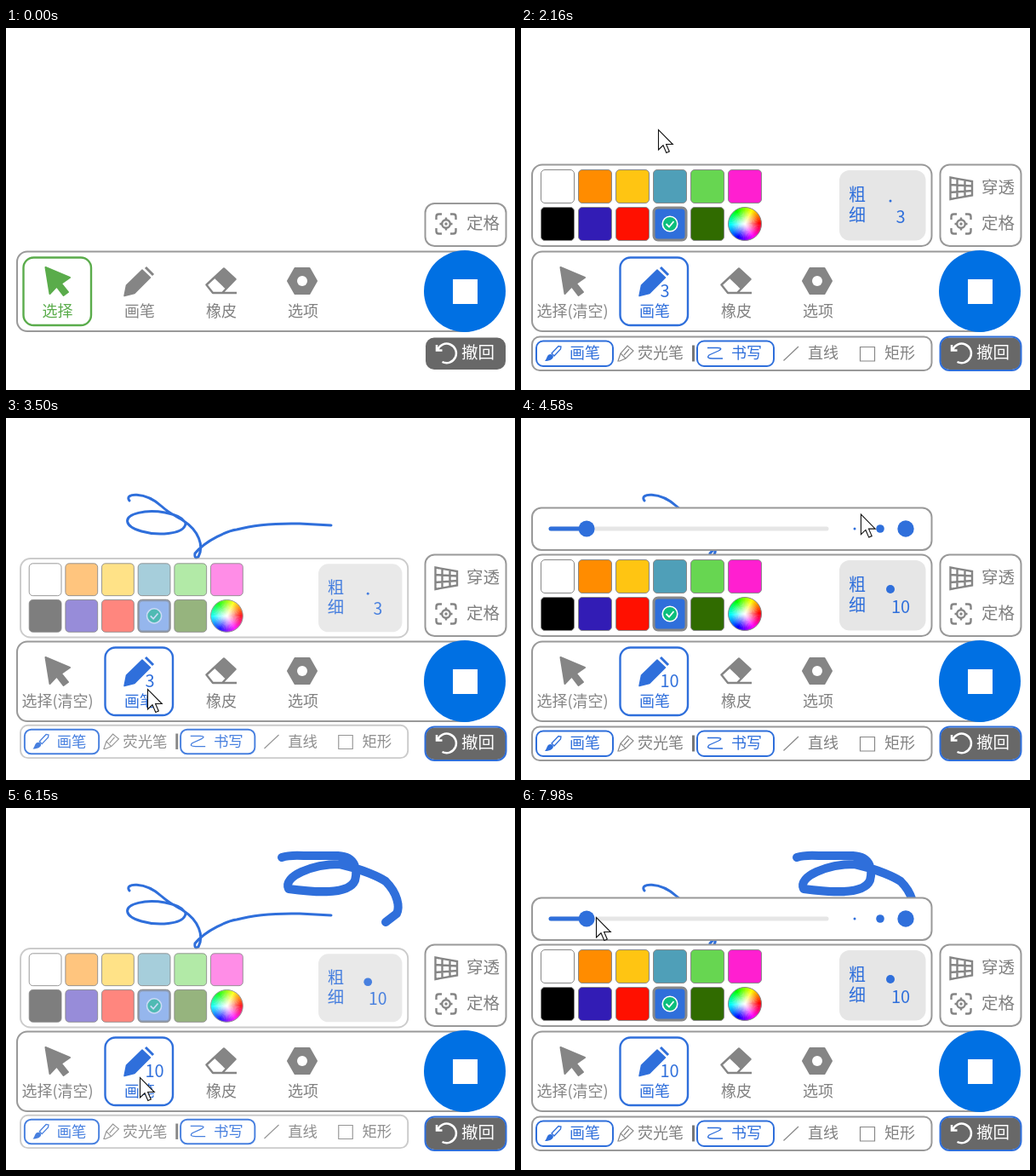
Animation, 598 px wide and 425 px high, one loop 8000 ms. Source, as an HTML page:

```html
<!DOCTYPE html>
<html lang="zh-CN">
<head>
<meta charset="utf-8">
<title>画笔工具栏</title>
<style>
  html, body { margin: 0; width: 100%; height: 100%; overflow: hidden; background: #fff; }
  svg { display: block; width: 598px; height: 425px; }
  text { font: 350 18px "Noto Sans CJK SC", "Noto Sans CJK", "Noto Sans", sans-serif; fill: #808080; }
  .large { font-size: 19.5px; }
  .size { font-size: 20px; }
  .panel { fill: #fff; stroke: #999; stroke-width: 2; }
  .ring { fill: none; stroke: currentColor; stroke-width: 2; }
  .tool { stroke-width: 2.4; }
  .ink { fill: currentColor; }
  .line { fill: none; stroke: currentColor; stroke-width: 1.3; }
  .solid { fill: #858585; }
  .thin { fill: none; stroke: #888; stroke-width: 1.2; }
  .wire { fill: none; stroke: #858585; stroke-width: 2.4; }
  .drawing { fill: none; stroke: #2f6fdb; stroke-linecap: round; stroke-linejoin: round; }
  .soft { opacity: var(--soft); }
  .crisp { opacity: var(--crisp); }
  .swatch { stroke: #888; fill-opacity: var(--soft); stroke-opacity: var(--crisp); }
</style>
</head>
<body>
<svg id="stage" viewBox="0 0 598 425">
  <path id="thinStroke" class="drawing" stroke-width="3"
    d="M145 97C138 88 163 86 182 103S215 119 210 127A34 13 4 1 1 209 121C226 132 233 150 226 163Q221 166 222 159C235 143 262 132 271 131Q300 123 345 124L382 126"/>
  <path id="thickStroke" class="drawing" stroke-width="10"
    d="M324 58Q333 55 350 56H390C412 57 413 74 410 85C402 104 355 98 332 95C325 80 360 66 392 66C420 72 440 82 446 86C460 100 463 116 459 124L446 134"/>

  <g id="sliderPanel">
    <rect class="panel soft" x="13" y="105.500" width="469.500" height="49.500" rx="11"/>
    <g class="crisp">
      <path d="M35 130H359" stroke="#e6e6e6" stroke-width="5" stroke-linecap="round"/>
      <path id="sliderFill" stroke="currentColor" stroke-width="5" stroke-linecap="round"/>
      <circle id="thumb" class="ink" cy="130" r="9.500"/>
      <circle class="ink" cx="392" cy="130" r="1.500"/>
      <circle class="ink" cx="422" cy="130" r="4.800"/>
      <circle class="ink" cx="452" cy="130" r="9.700"/>
    </g>
  </g>

  <g id="penPanels">
    <rect class="panel soft" x="13" y="160.500" width="469.500" height="95.500" rx="12"/>
    <g id="swatches"></g>
    <g id="wheel" class="crisp" transform="translate(263 230)"></g>
    <g id="check" class="soft">
      <rect x="-19" y="-19" width="38" height="38" rx="5" fill="none" stroke="#888" stroke-width="3"/>
      <circle r="8.800" fill="#0cbf7c" stroke="#fff" stroke-width="1.600"/>
      <path d="M-4.500 0L-1 3.500L4.500 -3" fill="none" stroke="#fff" stroke-width="1.800"/>
    </g>
    <g class="crisp">
      <rect x="374" y="167" width="101.500" height="82.500" rx="12" fill="#e6e6e6"/>
      <text class="size ink" x="385" y="203">粗</text>
      <text class="size ink" x="385" y="227">细</text>
      <circle id="sizeDot" class="ink" cx="434"/>
      <text id="sizeText" class="size ink" x="446" y="229" text-anchor="middle"></text>
    </g>

    <rect class="panel soft" x="13" y="362.500" width="469.500" height="39.500" rx="9"/>
    <g class="crisp">
      <rect class="ring" x="18" y="367.500" width="90" height="29.500" rx="8"/>
      <rect class="ring" x="207" y="367.500" width="90" height="29.500" rx="8"/>
      <path class="ink" d="M28 391C31 388 30 383 35 383C40 384 39 391 28 391Z"/>
      <path class="line" d="M36 382L44 373.500L47 374L46.500 377L39 385Z"/>
      <path class="thin" d="M114 391L117 382L125 373L132 379L123 388L116 391ZM117 382L123 388M121 384L127 377"/>
      <path d="M202.500 372.500V391.500" stroke="#777" stroke-width="3"/>
      <path class="line" d="M219 375.500H231Q238 376 232 379L221 384Q217 388 225 388H237"/>
      <path class="thin" d="M308.500 390.500L326 374M398.500 374.500h17v16.500h-17z"/>
      <text class="ink" x="57" y="388">画笔</text>
      <text x="137" y="388">荧光笔</text>
      <text class="ink" x="247" y="388">书写</text>
      <text x="337" y="388">直线</text>
      <text x="427" y="388">矩形</text>
    </g>
  </g>

  <rect class="panel" x="13" y="262.500" width="540" height="93.500" rx="12"/>
  <g id="selectTool">
    <rect id="selectRing" class="ring tool" x="20.500" y="269.500" width="79.500" height="79.500" rx="12"/>
    <path class="ink" d="M46.500 281L75 293L65 300L73 310L67.500 314L59.500 303.500L51.500 312Z" stroke="currentColor" stroke-width="2" stroke-linejoin="round"/>
    <text id="selectText" class="ink" x="60.500" y="339" text-anchor="middle"></text>
  </g>
  <g id="penTool">
    <rect id="penRing" class="ring tool" x="116.500" y="269.500" width="79.500" height="79.500" rx="12"/>
    <path class="ink" d="M139 314.500L141.500 302L160 284L169.500 293L151 311.500Z" stroke="currentColor" stroke-width="1.500" stroke-linejoin="round"/>
    <path d="M164 281L173 290" stroke="currentColor" stroke-width="3"/>
    <text class="ink" x="139" y="339">画笔</text>
    <text id="penSize" class="size ink" x="163.500" y="316"></text>
  </g>
  <path class="wire" d="M235.500 301.500L256 282.500L269.500 295L254 311H243ZM243 311H271" stroke-linejoin="round"/>
  <path class="solid" d="M244 293L256 282L270 295L258.500 307Z"/>
  <text x="235" y="339">橡皮</text>
  <path class="solid" d="M331 297L339.500 282H356.500L365 297L356.500 312H339.500Z" stroke="#858585" stroke-width="2" stroke-linejoin="round"/>
  <circle cx="348" cy="297" r="6" fill="#fff"/>
  <text x="331" y="339">选项</text>

  <rect id="sidePanel" class="panel" x="492.500" width="95" rx="11"/>
  <g id="passTool">
    <path class="wire" d="M504.500 175.500L530 180V196.500L504.500 201ZM512.500 177V199.500M521.500 178.500V198M504.500 184L530 185.500M504.500 193L530 191" stroke-width="2"/>
    <text class="large" x="541" y="194">穿透</text>
  </g>
  <g id="focus" class="wire" transform="translate(517 230)">
    <circle r="4.800"/>
    <circle class="solid" r="1.700" stroke="none"/>
  </g>
  <text class="large" x="541" y="236">定格</text>

  <circle cx="539" cy="309" r="48" fill="#0070e3"/>
  <rect x="525" y="295" width="29" height="29" fill="#fff"/>

  <rect x="493" y="363.500" width="94" height="37.500" rx="10" fill="#686868"/>
  <rect id="undoRing" class="ring" x="492.500" y="362.500" width="95" height="39.500" rx="11"/>
  <path d="M506 372V378.500H512.500M507 378A11.300 11.300 0 1 1 512.500 392" fill="none" stroke="#fff" stroke-width="2.500"/>
  <text class="large" x="535" y="388" style="fill:#fff">撤回</text>

  <path id="cursor" d="M.5 .5V24L6 18.800L9.800 27.500L13.300 26L9.600 17.500H17.300Z" fill="#fff" stroke="#111" stroke-width="1.100"/>
</svg>

<script>
const LOOP = 8000;
const RED = '#ff1000', BLUE = '#2f6fdb', GREEN = '#5aac4b', GREY = '#858585';
const PEN_ON = 1250, PICK_BLUE = 1850, PICK_MEDIUM = 4420;
const OPEN_MS = 250, CLOSE_MS = 150;

const penShown = [[PEN_ON, 2350], [3375, 4800], [6025, Infinity]];
const sliderShown = [[4000, 4800], [7130, Infinity]];

const $ = id => document.getElementById(id);
const clamp = v => Math.max(0, Math.min(1, v));
const easeOut = (p, power = 3) => 1 - (1 - p) ** power;
const progress = (t, from, to) => clamp((t - from) / (to - from));
const set = (el, attrs) => { for (const k in attrs) el.setAttribute(k, attrs[k]); };
const show = (id, on) => set($(id), { visibility: on ? 'visible' : 'hidden' });
function add(parent, tag, attrs) {
  const el = document.createElementNS('http://www.w3.org/2000/svg', tag);
  set(el, attrs);
  parent.append(el);
  return el;
}

function makeStroke(id, from, to) {
  const el = $(id), length = el.getTotalLength();
  const at = p => {
    const { x, y } = el.getPointAtLength(length * p);
    return [x, y];
  };
  return { id, el, length, from, to, at };
}
const thin = makeStroke('thinStroke', 2300, 2980);
const thick = makeStroke('thickStroke', 4800, 5200);

// Cursor moves: start time, end time, then the place it goes to or the stroke it draws.
const sizeBox = [428, 218];
const moves = [
  [170, 330, [125, 307]],
  [900, 1200, [177, 300]],
  [1400, 1680, [176, 232]],
  [1900, 2150, [161, 119]],
  [2180, 2300, thin.at(0)],
  [thin.from, thin.to, thin],
  [3050, 3330, [166, 318]],
  [3560, 3850, sizeBox],
  [4020, 4280, [420, 128]],
  [4560, 4740, thick.at(0)],
  [thick.from, thick.to, thick],
  [5210, 5390, [469, 292]],
  [5710, 5950, [157, 316]],
  [6300, 6620, sizeBox],
  [7350, 7940, [88, 128]],
];

function cursorAt(t) {
  let pos = [434, 371];
  for (const [from, to, goal] of moves) {
    if (t < from) break;
    const p = progress(t, from, to);
    pos = goal.at === thin.at || goal.at === thick.at
      ? goal.at(p)
      : pos.map((v, i) => v + (goal[i] - v) * easeOut(p, 2));
  }
  return pos;
}

const palette = [
  ['#fff', '#ff8c00', '#ffc512', '#4f9fb8', '#67d651', '#ff1fd0'],
  ['#000', '#321cb5', RED, BLUE, '#306b00'],
];
palette.forEach((row, r) => row.forEach((fill, c) => add($('swatches'), 'rect', {
  class: 'swatch', x: 23.5 + 44 * c, y: 166.5 + 44 * r, width: 39, height: 39, rx: 4.5, fill,
})));

function buildWheel(wheel) {
  const R = 19.5, N = 60, at = a => `${R * Math.cos(a)} ${-R * Math.sin(a)}`;
  for (let i = 0; i < N; i++) {
    const a = i / N * 2 * Math.PI, b = (i + 1.3) / N * 2 * Math.PI;
    add(wheel, 'path', { d: `M0 0L${at(a)}L${at(b)}Z`, fill: `hsl(${i * 360 / N} 100% 50%)` });
  }
  const glow = add(wheel, 'radialGradient', { id: 'glow' });
  add(glow, 'stop', { offset: 0, 'stop-color': '#fff' });
  add(glow, 'stop', { offset: 0.85, 'stop-color': '#fff', 'stop-opacity': 0 });
  add(wheel, 'circle', { r: R, fill: 'url(#glow)', stroke: '#888' });
}
buildWheel($('wheel'));

// One corner and one tick, repeated around the focus mark.
for (let angle = 0; angle < 360; angle += 90) {
  add($('focus'), 'path', {
    d: 'M-11.500 -5V-8.500Q-11.500 -11.500 -8.500 -11.500H-5M0 -7.500V-4',
    transform: `rotate(${angle})`,
  });
}

function visibility(t, spans) {
  const span = spans.find(([a, b]) => t >= a && t < b + CLOSE_MS);
  return span ? clamp((t - span[0]) / OPEN_MS) * (1 - clamp((t - span[1]) / CLOSE_MS)) : 0;
}

// Panels grow out of the button; their contents appear sooner than their frames.
function pop(el, p, cx, cy) {
  const eased = easeOut(p), scale = 0.75 + 0.25 * eased;
  el.style.setProperty('--soft', p);
  el.style.setProperty('--crisp', eased);
  set(el, { transform: `translate(${cx} ${cy}) scale(${scale}) translate(${-cx} ${-cy})` });
}

function render(t) {
  const penOn = t >= PEN_ON, blue = t >= PICK_BLUE, medium = t >= PICK_MEDIUM;
  const size = medium ? 10 : 3;
  $('stage').style.color = blue ? BLUE : RED;

  $('selectTool').style.color = penOn ? GREY : GREEN;
  $('selectText').textContent = penOn ? '选择(清空)' : '选择';
  $('penTool').style.color = penOn ? '' : GREY;
  show('selectRing', !penOn);
  for (const id of ['penRing', 'undoRing', 'penSize']) show(id, penOn);

  $('penSize').textContent = $('sizeText').textContent = size;
  set($('sizeDot'), { cy: medium ? 201 : 203, r: size / 2 });
  set($('check'), { transform: `translate(${blue ? 175 : 131} 230)` });

  const thumbX = 33 + 4.9 * (size - 1);
  set($('thumb'), { cx: thumbX });
  set($('sliderFill'), { d: `M35 130H${thumbX}` });

  pop($('penPanels'), visibility(t, penShown), 145, 308);
  pop($('sliderPanel'), visibility(t, sliderShown), 425, 208);

  const side = progress(t, PEN_ON, PEN_ON + 180), top = 206 - 45.5 * easeOut(side);
  set($('sidePanel'), { y: top, height: 256 - top });
  set($('passTool'), { opacity: side });

  for (const s of [thin, thick]) {
    show(s.id, t >= s.from);
    const drawn = s.length * progress(t, s.from, s.to);
    set(s.el, { 'stroke-dasharray': `${drawn} ${s.length + 20}` });
  }

  set($('cursor'), { transform: `translate(${cursorAt(t)})` });
  show('cursor', t >= 170);
}

const start = performance.now();
function tick() {
  render((performance.now() - start) % LOOP);
  requestAnimationFrame(tick);
}
tick();
</script>
</body>
</html>
```
